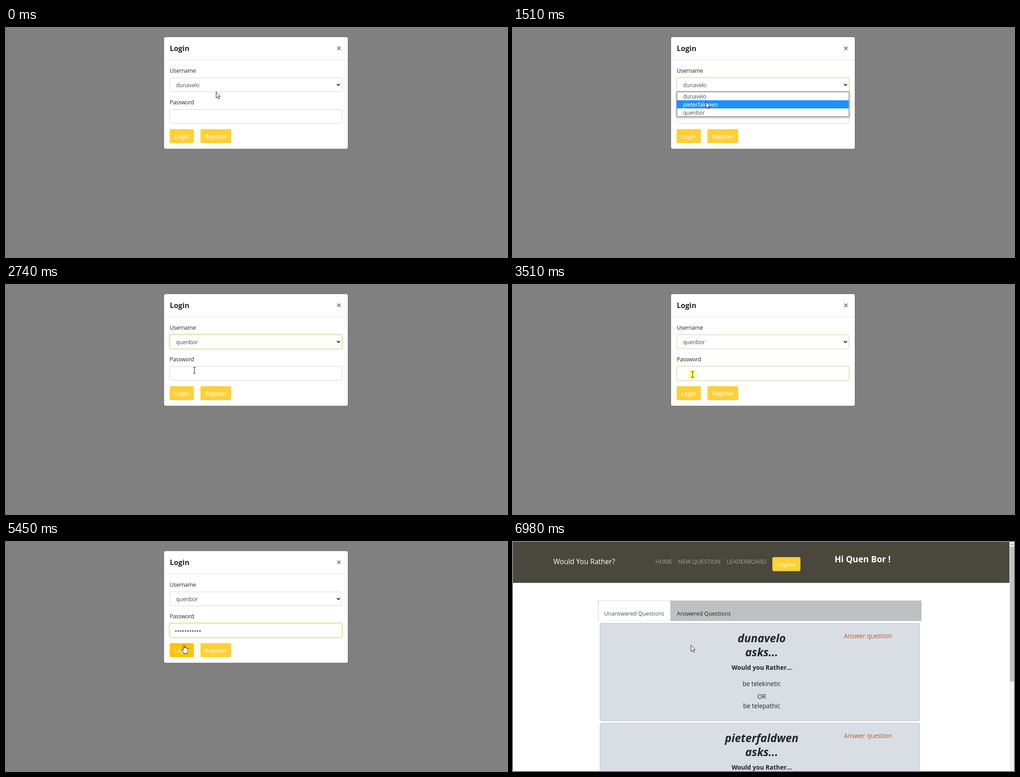
Write an HTML page that moves like this. It is 1105x507 px and loops after 8 s.

```html
<!DOCTYPE html>
<html lang="en">
<head>
<meta charset="utf-8">
<title>Login</title>
<style>
  html, body { margin: 0; width: 100%; height: 100%; overflow: hidden; background: #808080; }
  svg { display: block; width: 100%; height: 100%; }
  text { font: 12.4px "Open Sans", "Noto Sans", sans-serif; fill: #212529; }
  .tight { letter-spacing: -.02em; }
  .field { fill: #495057; }
  .btn { font-size: 12.6px; fill: #fff; text-anchor: middle; }
  .nav { font-size: 12.5px; fill: #a4a29d; }
  .mid { font-size: 13.6px; text-anchor: middle; }
  .bold { font-weight: 700; }
  .title { font-size: 24.4px; font-weight: 700; font-style: italic; text-anchor: middle; }
  .box { fill: #fff; stroke: #ced4da; }
  .ring { fill: none; stroke: #ffc107; stroke-opacity: .3; stroke-width: 3; }
  .pointer { fill: #fff; stroke: #000; stroke-width: .9; stroke-linejoin: round; }
  #shadow { filter: drop-shadow(0 1.5px 2.5px rgba(0, 0, 0, .5)); }
</style>
</head>
<body>
<svg viewBox="0 0 1105 507">
  <defs>
    <clipPath id="popClip"><rect x="360" y="142" width="382" height="54"/></clipPath>
  </defs>

  <g id="login">
    <rect width="1105" height="507" fill="#808080"/>
    <rect x="348" y="19.5" width="406.5" height="248.5" rx="4" fill="#fff" stroke="#626262"/>
    <text class="bold" x="361.3" y="51.3" style="font-size:15.9px">Login</text>
    <path d="M730.6 41.3l7.2 7.2m0-7.2l-7.2 7.2" stroke="#7d7d7d" stroke-width="2"/>
    <path d="M348.5 70.5H754" stroke="#dee2e6"/>

    <text class="tight" x="361" y="98.5">Username</text>
    <rect id="userRing" class="ring" x="360" y="109" width="382.5" height="33" rx="4.5"/>
    <rect id="userBox" class="box" x="361.5" y="110.5" width="379.5" height="30.5" rx="3.3"/>
    <text id="user" class="field tight" x="375" y="130.8"></text>
    <path d="M729.8 124l3.4 3.4 3.4-3.4" fill="none" stroke="#222" stroke-width="1.8"/>

    <g id="pass">
      <text class="tight" x="361" y="168.6">Password</text>
      <rect id="passRing" class="ring" x="360" y="179" width="382.5" height="33" rx="4.5"/>
      <rect id="passBox" class="box" x="361.5" y="180.5" width="379.5" height="30.5" rx="3.3"/>
    </g>
    <g id="dots" fill="#495057"></g>
    <path id="caret" stroke="#333"/>

    <rect id="btnRing" x="359.5" y="222.5" width="56.5" height="34" rx="4.5" fill="none" stroke="#ffdf80" stroke-width="3"/>
    <rect id="btn" x="361" y="224" width="53.5" height="31" rx="3.3"/>
    <text class="btn" x="387.8" y="244.6">Login</text>
    <rect x="429" y="224" width="67.8" height="31" rx="3.3" fill="#ffd036"/>
    <text class="btn" x="462.7" y="244.6">Register</text>

    <g id="popup">
      <rect id="shadow" x="361" y="141" width="380.5" height="55.5" fill="#fff"/>
      <use id="through" href="#pass" clip-path="url(#popClip)"/>
      <g id="list">
        <rect x="361.5" y="141.5" width="379.5" height="54.5" fill="#fff" stroke="#6b6b6b"/>
        <rect id="mark" x="362" width="378.5" height="18" fill="#1e90ff"/>
        <g id="options"></g>
      </g>
    </g>
  </g>

  <g id="home">
    <rect width="1105" height="507" fill="#fff"/>
    <rect width="1095" height="90.5" fill="#4a473d"/>
    <text x="89" y="49.4" style="font-size:15.5px;fill:#fff">Would You Rather?</text>
    <text class="nav" x="314" y="48.2">HOME</text>
    <text class="nav" x="364.3" y="48.2">NEW QUESTION</text>
    <text class="nav" x="471.5" y="48.2">LEADERBOARD</text>
    <rect x="572" y="33.5" width="62" height="31" rx="3.3" fill="#ffd036"/>
    <text class="btn" x="602.8" y="53.7">Logout</text>
    <text class="bold" x="771" y="44.6" text-anchor="middle" style="font-size:18.8px;fill:#fff">Hi Quen Bor !</text>

    <rect x="187.5" y="129.5" width="713.5" height="45.5" fill="#bfc0c1"/>
    <path d="M188.5 175V133q0-3 3-3H344q3 0 3 3V175Z" fill="#fff" stroke="#e2e5e8" stroke-width=".8"/>
    <text x="201" y="163.2" class="field" style="font-size:12.2px">Unanswered Questions</text>
    <text x="361.3" y="163.2" style="font-size:12.4px">Answered Questions</text>
    <g id="cards"></g>

    <rect x="1095" width="10" height="507" fill="#f1f1f1"/>
    <rect x="1096" y="10" width="9" height="299" fill="#c1c1c1"/>
    <path d="M1097.5 6.5l3-3.5 3 3.5Z" fill="#8a8a8a"/>
  </g>

  <circle id="click" r="10" fill="#ff0" fill-opacity=".47"/>
  <g id="cursor">
    <path id="arrow" class="pointer" d="M.5 .5V14.2L3.6 11.3 5.7 16.2 7.9 15.2 5.8 10.5H10Z"/>
    <g id="beam" fill="none">
      <path d="M-3-6.5H-1L0-5.8 1-6.5H3M0-6V6M-3 6.5H-1L0 5.8 1 6.5H3" stroke="#222" stroke-width="1.1"/>
    </g>
    <path id="hand" class="pointer" d="M-1 1.3Q-1 .4 .4 .4T1.8 1.5V7Q4-.0 4.4 7.2 6.5 5.6 7 7.8 9.4 6.8 9.4 9.5V13.5L8 16.5V19H0V17L-4.2 11.5Q-5 9-2.8 10L-1 11.8Z"/>
  </g>
</svg>

<script>
const LOOP = 8000;
const names = ["dunavelo", "pieterfaldwen", "quenbor"];
const $ = id => document.getElementById(id);
const show = (id, on) => $(id).setAttribute("display", on ? "inline" : "none");
const set = (id, attrs) => { for (const k in attrs) $(id).setAttribute(k, attrs[k]); };
const within = (t, a, b) => t >= a && t < b;
const clamp = v => Math.max(0, Math.min(1, v));

// Last entry whose start time has passed
const at = (track, t) => track.filter(k => k[0] <= t).pop();

const pointer = [
  [0, 463, 141, "arrow"], [340, 450, 135, "arrow"], [430, 439, 130, "arrow"],
  [960, 431, 138, "arrow"], [1270, 430, 145, "arrow"], [1350, 428, 152, "arrow"],
  [1430, 426, 158, "arrow"], [1510, 425, 163, "arrow"], [1660, 423, 168, "arrow"],
  [1760, 420, 174, "arrow"], [1860, 417, 180, "arrow"], [1960, 414, 185, "arrow"],
  [2060, 413, 188, "arrow"], [2740, 415.5, 189, "beam"], [3120, 408, 193, "beam"],
  [3200, 400, 196, "beam"], [3280, 396, 198, "beam"], [5230, 395, 205, "beam"],
  [5300, 394, 216, "arrow"], [5380, 393, 225, "hand"], [5450, 392, 228, "hand"],
  [6610, 392, 228, "arrow"]
];
const typed = [[0, 0], [3840, 2], [3880, 3], [4060, 4], [4120, 5], [4290, 7], [4440, 8], [4590, 9], [4760, 11]];
const clicks = [[650, 800], [2510, 2660], [3510, 3600], [5840, 6000]];

const card = (y, name) => `
  <rect x="192" y="${y}" width="705" height="216" rx="3.5" fill="#d9dee5" stroke="#b7bcc8"/>
  <text class="title" x="548.5" y="${y + 42}">${name}</text>
  <text class="title" x="548.5" y="${y + 73}">asks...</text>
  <text class="mid bold" x="548.5" y="${y + 103}">Would you Rather...</text>
  <text class="mid" x="548.5" y="${y + 139}">be telekinetic</text>
  <text class="mid" x="548.5" y="${y + 166.5}">OR</text>
  <text class="mid" x="548.5" y="${y + 187.5}">be telepathic</text>
  <text class="mid" x="783" y="${y + 33}" style="fill:#b35c2c">Answer question</text>`;

$("cards").innerHTML = card(180, names[0]) + card(401, names[1]);
$("options").innerHTML = names.map((n, i) =>
  `<text class="tight" x="375" y="${155.7 + i * 18}">${n}</text>`).join("");
$("dots").innerHTML = Array.from({ length: 11 }, (_, i) =>
  `<circle cx="${374.8 + i * 5.3}" cy="197" r="1.75"/>`).join("");

function drawFocus(id, level) {
  set(id + "Ring", { opacity: level });
  set(id + "Box", { stroke: level > .3 ? "#ffe393" : "#ced4da" });
}

function draw(t) {
  const [, x, y, shape] = at(pointer, t);
  set("cursor", { transform: `translate(${x} ${y})` });
  ["arrow", "beam", "hand"].forEach(s => show(s, s === shape));
  set("click", { cx: x, cy: y });
  show("click", clicks.some(([a, b]) => within(t, a, b)));

  const home = t >= 6980;
  show("home", home);
  show("login", !home);
  if (home) return;

  $("user").textContent = names[t < 2660 ? 0 : 2];
  drawFocus("user", t < 1030 ? 0 : t < 2660 ? .65 : t < 3510 ? 1 : t < 3600 ? .3 : 0);
  drawFocus("pass", t < 3510 ? 0 : t < 3600 ? .6 : t < 5840 ? 1 : t < 5920 ? .3 : 0);

  show("popup", within(t, 960, 2660));
  show("through", t < 1030);
  show("list", t >= 1030);
  const row = Math.max(0, Math.min(2, Math.floor((y - 142) / 18)));
  set("mark", { y: 142 + row * 18 });
  [...$("options").children].forEach((o, i) => { o.style.fill = i === row ? "#fff" : "#495057"; });

  const count = at(typed, t)[1];
  [...$("dots").children].forEach((d, i) => d.setAttribute("display", i < count ? "inline" : "none"));
  set("caret", { d: `M${372.3 + count * 5.3} 188V204.5` });
  show("caret", within(t, 3600, 5300));

  const hover = clamp((t - 5300) / 150);
  set("btn", { fill: `rgb(255 ${208 - 13 * hover} ${54 - 46 * hover})` });
  set("btnRing", { opacity: clamp((t - 5760) / 240) });
}

function tick(now) {
  draw(now % LOOP);
  requestAnimationFrame(tick);
}
draw(0);
requestAnimationFrame(tick);
</script>
</body>
</html>
```
